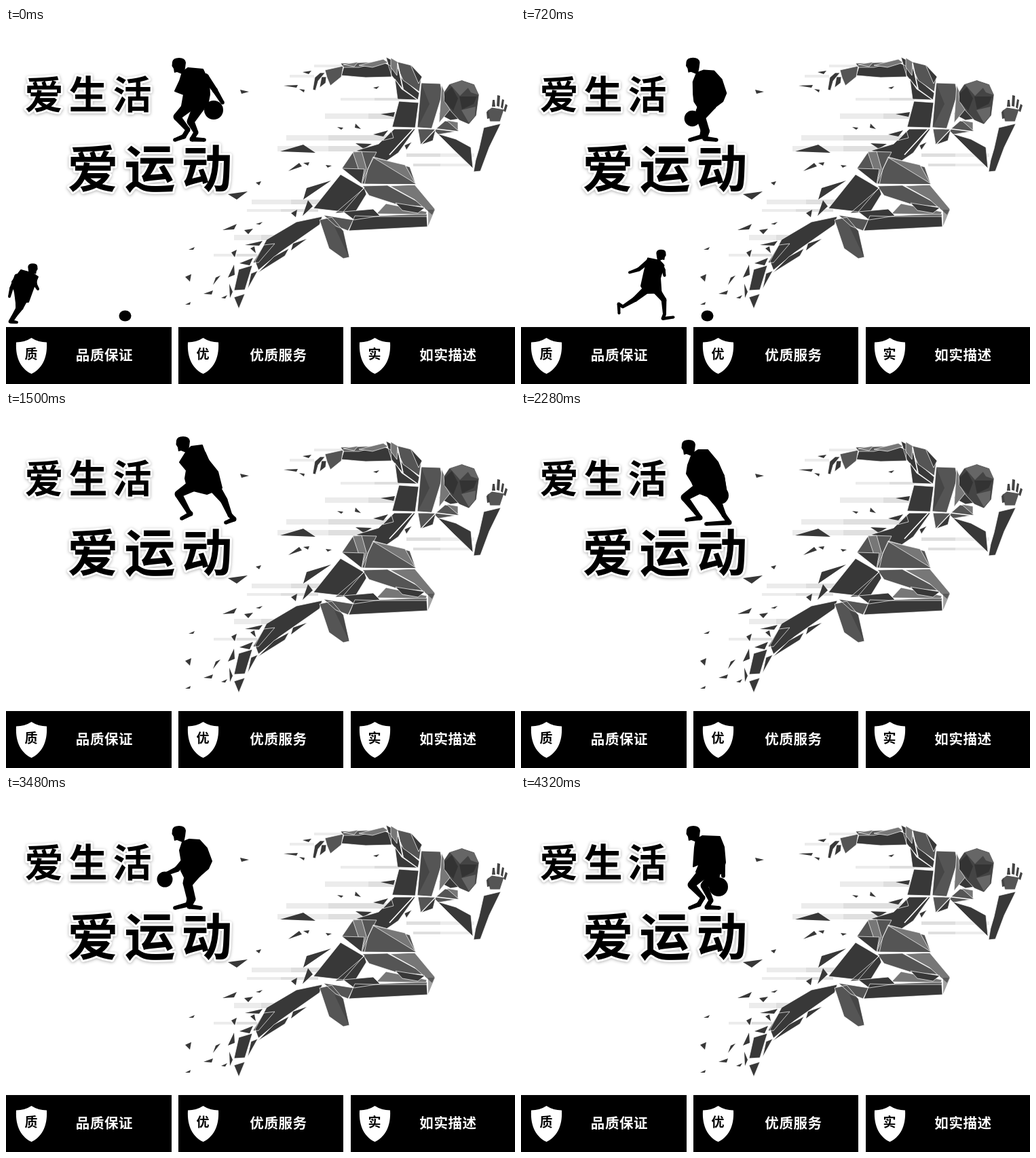
An HTML page with a canvas that plays this animation: 750x525 px, repeating every 4.38 s.

```html
<!DOCTYPE html>
<html lang="zh-CN">
<head>
<meta charset="utf-8">
<style>
html, body { margin: 0; width: 100%; height: 100%; overflow: hidden; background: #fff; }
svg, canvas { position: absolute; left: 0; top: 0; width: 750px; height: 525px; }
text { font-family: "Noto Sans CJK SC", "Noto Sans CJK JP", "Noto Sans CJK", sans-serif; font-weight: 900; text-anchor: middle; }
.title { paint-order: stroke; stroke: #fff; stroke-width: 6px; stroke-linejoin: round; filter: drop-shadow(0 1px 2px rgba(0,0,0,.3)); }
.label { font-size: 20.5px; font-weight: 700; fill: #fff; letter-spacing: .6px; }
.badge { font-size: 19px; font-weight: 700; }
</style>
</head>
<body>
<svg viewBox="0 0 750 525">
  <!-- speed lines -->
  <path fill="#ececec" d="M454 54h46v4h-46zM418 69h36v4h-36zM493 103h50v4h-50zM470 126h64v8h-64zM413 158h62v8h-62zM400 174h75v8h-75zM640 185h50v5h-50zM640 200h45v4h-45zM362 253h58v7h-58zM355 267h50v4h-50zM336 305h40v8h-40zM306 333h34v4h-34z"/>
  <path fill="#dfdfdf" d="M543 103h37v4h-37zM534 126h42v8h-42zM475 158h90v8h-90zM475 174h80v8h-80zM590 185h50v5h-50zM600 200h40v4h-40zM420 253h48v7h-48zM405 267h55v4h-55zM376 305h34v8h-34zM340 333h30v4h-30z"/>

  <!-- loose shards -->
  <g fill="#383838">
    <path d="M345 91L358 94 347 97zM409 85L430 84 428 88zM437 65L450 63 446 68zM432 90L440 91 439 95zM541 88L550 86 546 90zM404 182L438 172 456 184zM416 211L432 199 436 204zM438 199L447 198 445 203zM471 202L480 203 474 206zM488 146L497 147 494 150zM515 141L523 149 514 147z"/>
    <path d="M541 157L563 151 556 160zM515 170L539 171 527 178zM552 127L573 124 571 131zM327 245L356 241 340 253zM368 228L376 226 373 232zM319 298L340 289 336 297zM368 289L378 286 374 290zM351 298L364 296 357 304zM269 327L278 323 276 327zM352 320L378 314 373 321z"/>
    <path d="M332 331L340 327 337 338zM264 367L273 363 271 374zM305 379L309 368 316 365zM291 392L305 387 303 393zM264 408L272 404 271 408zM317 398L326 394 323 399zM327 368L336 349 337 364zM329 377L334 389 330 398zM344 347L364 339 359 350zM360 325L366 322 368 332zM420 273L429 268 427 279zM438 253L443 236 479 225zM437 277L445 254 452 263zM420 328L423 318 443 311z"/>
  </g>

  <!-- faceted sprinter -->
  <g stroke="#fff" stroke-width=".7" stroke-linejoin="round">
    <path fill="#383838" d="M452 91L455 73 463 66 470 66 460 78 456 92zM462 88L465 72 472 72 471 81zM494 70L498 57 555 50 567 56 568 72 530 73zM560 43L578 52 583 74 609 96 607 106 585 90 568 70zM573 75L583 90 606 106 577 105zM579 108L608 110 603 147 569 146z"/>
    <path fill="#383838" d="M572 149L603 149 578 184 546 206 538 187 515 181 549 171zM555 166L568 152 571 162zM493 216L527 236 497 271 453 266zM515 271L485 273 528 236 531 245zM428 286L466 278 462 290 402 332 372 357 367 344 384 312zM396 318L372 346 364 346 380 320z"/>
    <path fill="#383838" d="M371 361L395 337 417 325 411 336zM343 356L363 350 352 386 336 387zM356 385L361 362 371 358zM336 397L352 392 343 414zM697 178L704 147 729 141 712 176 699 211 689 212 692 195zM636 156L663 164 685 176 688 207 660 180zM646 107L659 118 668 134 655 136 638 127z"/>
    <path fill="#555" d="M470 62L497 56 494 72 478 85 473 73zM493 52L553 50 520 58 497 58zM573 49L597 55 612 73 609 94 585 77zM612 81L640 82 643 97 627 149 606 147zM607 149L633 149 611 172zM631 151L647 137 662 139 667 152 637 157zM709 122L716 117 734 120 728 138 713 138z"/>
    <path fill="#555" d="M495 207L512 182 546 183 533 208 528 231zM524 230L541 190 595 205 604 231zM525 233L562 232 621 264 575 260 535 247zM505 299L545 277 620 274 621 293zM462 283L480 279 497 299 506 338 497 340 476 325zM468 276L512 283 504 299 486 292z"/>
    <path fill="#777" d="M497 54L519 50 513 57zM520 55L556 46 563 51 540 58zM567 44L577 50 576 70 567 58zM642 84L656 118 638 140zM649 136L666 139 666 151zM511 183L524 182 531 207 525 225zM541 191L588 202 603 229zM566 233L602 231 632 267 628 276 602 253zM546 274L560 259 620 271 619 275z"/>
    <path fill="#383838" d="M596 54L613 72 608 82zM497 271L541 267 551 277 513 283zM514 277L547 278 620 278 621 293 505 299zM574 258L617 265 607 273 584 269zM495 207L528 208 524 230zM612 172L633 150 629 166zM587 173L598 168 590 180z"/>
    <path fill="#444" d="M645 95L653 83 672 77 690 83 697 99 693 129 682 142 668 136 656 123 646 108z"/>
    <path fill="#666" d="M654 83L672 77 683 86 669 100zM675 79L690 84 697 99 685 95zM671 121L692 116 691 130 682 140z" stroke="none"/>
    <path fill="#333" d="M646 97L657 87 666 104 659 122 646 108zM668 101L694 101 689 112 672 120z" stroke="none"/>
    <path fill="#333" d="M622 268L632 268 622 292zM612 82L624 112 607 146zM484 293L497 299 505 337z" stroke="none" opacity=".45"/>
    <path fill="#444" stroke="none" d="M716 116L717 106 720 106 721 116zM723 115L724 99 728 100 727 116zM729 117L731 105 734 106 732 119zM733 122L736 112 739 114 736 124zM709 134L708 124 711 121 713 133z"/>
    <path fill="none" stroke-width="1.6" d="M580 107L608 108M604 147L635 149 668 153M577 52L585 90M524 231L604 231M600 149L565 187M492 206L528 236"/>
  </g>
</svg>

<canvas id="stage" width="750" height="525"></canvas>

<svg viewBox="0 0 750 525">
  <text class="title" font-size="57" x="56 121 186" y="119">爱生活</text>
  <text class="title" font-size="75" x="128 212 296" y="234.500">爱运动</text>
  <path d="M0 441H244V525H0zM254 441H497V525H254zM508 441H750V525H508z"/>
  <defs>
    <path id="shield" fill="#fff" d="M0-26.500Q-10-20-22.500-20C-24 5-14 20 0 26.500C14 20 24 5 22.500-20Q10-20 0-26.500z"/>
  </defs>
  <use href="#shield" x="37.500" y="483.500"/>
  <use href="#shield" x="290.500" y="483.500"/>
  <use href="#shield" x="543.500" y="483.500"/>
  <text class="badge" x="37" y="488">质</text>
  <text class="badge" x="290" y="488">优</text>
  <text class="badge" x="543" y="488">实</text>
  <text class="label" x="145" y="490">品质保证</text>
  <text class="label" x="401.500" y="490">优质服务</text>
  <text class="label" x="651.500" y="490">如实描述</text>
</svg>

<script>
const LOOP = 4380, STEP = 60;
const ctx = document.getElementById('stage').getContext('2d');
const nums = s => s.split(/[ ,]+/).map(Number);

// torso outline; legs are hip, knee, ankle, heel, toe; arms are shoulder, elbow, hand
const pose = (t, head, torso, legA, legB, armA, last) =>
  ({ t, parts: [head, torso, legA, legB, armA, last].map(nums) });

const dribble = [
  pose(0, '254,55', '260,65 268,59 290,61 299,80 300,98 297,114 281,126 259,115 262,98 249,93 256,78',
    '272,112 252,131 268,150 262,160 249,165', '284,116 272,138 280,154 274,164 292,165',
    '294,72 308,92 319,110', '306,121,14'),
  pose(60, '253,55', '258,64 267,59 293,60 299,75 301,98 297,112 282,124 258,112 263,100 254,104 256,76',
    '270,112 251,131 268,150 262,160 249,165', '284,118 270,132 280,154 274,164 292,165',
    '294,75 297,96 298,118', '291,134,14'),
  pose(420, '250,54', '257,64 268,60 283,61 295,74 301,96 296,110 276,122 258,112 251,106 246,97 250,78',
    '268,108 255,125 265,148 264,160 249,165', '280,112 262,134 272,152 272,163 289,165',
    '293,100 288,118 298,136', '283,151,12'),
  pose(900, '254,55', '260,68 270,64 285,65 296,77 303,96 298,107 283,120 264,122 258,110 259,98 256,80',
    '272,115 266,128 270,152 268,160 249,165', '280,112 269,130 276,152 270,163 287,165',
    '268,90 252,108 238,114', '234,123,11.5'),
  pose(1020, '254,53', '260,65 270,60 283,62 294,72 302,96 296,107 282,120 264,124 258,108 256,95 254,78',
    '272,115 265,130 268,152 267,160 249,165', '280,112 269,131 276,152 270,163 287,165',
    '268,92 258,108 250,122', '243,133,12'),
  pose(1500, '260,47', '266,58 273,51 289,49 296,68 312,88 318,112 296,121 268,114 264,98 266,86 256,74',
    '276,108 254,121 269,147 272,150 259,157', '305,108 321,130 330,152 336,158 324,163',
    '290,62 300,82 306,98', '291,100,12'),
  pose(2100, '246,52', '252,62 261,56 275,56 290,74 299,95 302,115 284,128 258,118 252,104 244,91 246,78',
    '266,110 241,126 258,148 264,156 244,159', '280,118 292,138 299,152 307,163 273,165',
    '285,75 296,95 301,118', '293,123,13')
];

const kick = [
  pose(0, '40,355', '40,362 22,357 9,374 13,390 15,405 33,404 41,382 47,367',
    '20,398 18,414 10,426 6,433 15,434', '27,398 22,412 14,424 8,433 16,434',
    '16,366 8,384 5,396', '42,370 43,378 47,385'),
  pose(420, '119,334', '114,343 98,338 93,360 83,381 92,390 115,391 112,374 121,352',
    '96,382 66,398 50,418 45,414 45,426', '108,384 123,404 131,424 131,430 145,425',
    '100,342 82,348 63,347', '117,348 124,354 129,360'),
  pose(1020, '295,335', '294,343 276,341 271,356 271,380 275,392 298,390 298,364 300,348',
    '280,384 270,402 250,404 243,400 244,415', '287,384 298,398 292,420 287,427 304,428',
    '276,346 265,364 257,374', '295,350 296,360 294,370')
];

function blend(poses, t) {
  let i = 0;
  while (i < poses.length - 2 && t >= poses[i + 1].t) i++;
  const a = poses[i], b = poses[i + 1], k = (t - a.t) / (b.t - a.t);
  return a.parts.map((p, j) => p.map((v, n) => v + (b.parts[j][n] - v) * k));
}

function disc(x, y, rx, ry = rx) {
  ctx.beginPath();
  ctx.ellipse(x, y, rx, ry, 0, 0, 7);
  ctx.fill();
}

function outline(p) {
  ctx.beginPath();
  for (let i = 0; i < p.length; i += 2) ctx.lineTo(p[i], p[i + 1]);
  ctx.closePath();
  ctx.fill();
  ctx.stroke();
}

// tapered segments with round joints; r is the radius at each joint
function limb(p, r) {
  r.forEach((ra, i) => {
    const x = p[2 * i], y = p[2 * i + 1];
    disc(x, y, ra);
    if (i === r.length - 1) return;
    const u = p[2 * i + 2], v = p[2 * i + 3], rb = r[i + 1];
    const d = Math.hypot(u - x, v - y) || 1, nx = (y - v) / d, ny = (u - x) / d;
    ctx.beginPath();
    ctx.moveTo(x + nx * ra, y + ny * ra);
    ctx.lineTo(u + nx * rb, v + ny * rb);
    ctx.lineTo(u - nx * rb, v - ny * rb);
    ctx.lineTo(x - nx * ra, y - ny * ra);
    ctx.fill();
  });
}

const face = new Path2D('M-9-5Q-8-11 1-11Q10-11 11-4L10 4 8 14-2 10-6 11-7 5-9.500 1z');

function figure([head, torso, legA, legB, armA], size, facing) {
  const leg = [9, 5.5, 3.5, 3.5, 2.8].map(r => r * size);
  ctx.save();
  ctx.translate(head[0], head[1]);
  ctx.scale(facing * size, size);
  ctx.fill(face);
  ctx.restore();
  outline(torso);
  limb(legA, leg);
  limb(legB, leg);
  limb(armA, [5, 4, 2.8].map(r => r * size));
}

function draw(t) {
  ctx.clearRect(0, 0, 750, 525);
  ctx.lineJoin = 'round';
  ctx.lineWidth = 2;

  // the dribble runs forward, then back
  const d = blend(dribble, Math.min(t, LOOP - t));
  figure(d, 1, 1);
  disc(...d[5]);

  if (t <= 1080) {
    const k = blend(kick, t);
    figure(k, .7, -1);
    limb(k[5], [3.5, 2.8, 2]);
  }
  if (t <= 840) disc(175.5 + Math.max(0, t - 420) * .33, 424.5, 9, 8);
}

const start = performance.now();
function tick() {
  const t = (performance.now() - start) % LOOP;
  draw(Math.floor(t / STEP) * STEP);
  requestAnimationFrame(tick);
}
tick();
</script>
</body>
</html>
```
